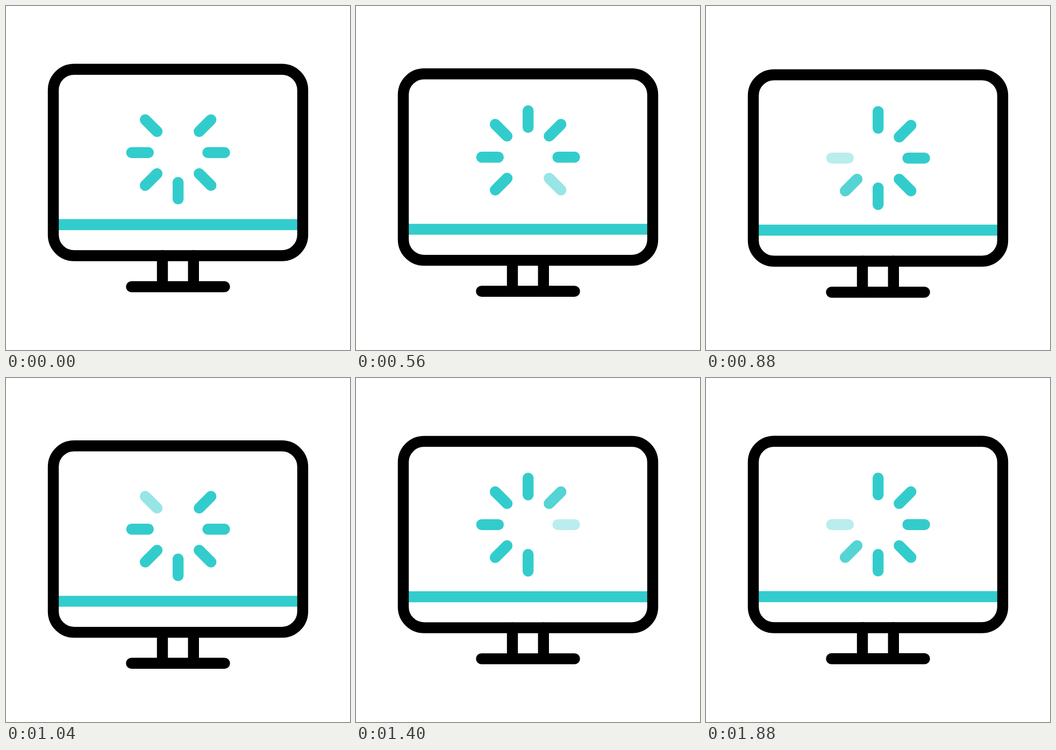
These frames come from a looping animation (640x640 px, 1920 ms). An HTML page:

```html
<!DOCTYPE html>
<html lang="en">
<head>
<meta charset="utf-8">
<title>Loading monitor</title>
<style>
  html, body { margin: 0; width: 100%; height: 100%; overflow: hidden; background: #fff; }
  svg { display: block; width: 100%; height: 100%; }
  .line { fill: none; stroke: #000; stroke-width: 20.4; stroke-linecap: round; }
  .accent { stroke: #33cccc; stroke-width: 20.4; }
  #spokes { stroke-linecap: round; }
</style>
</head>
<body>
<svg viewBox="0 0 640 640">
  <g id="monitor">
    <path class="accent" d="M90 406.8H550"/>
    <rect class="line" x="88" y="117.7" width="464" height="346.8" rx="38.7"/>
    <path class="line" d="M291 464.5V522.2M348.8 464.5V522.2M233.4 522.2H406.6"/>
    <g id="spokes" class="accent" transform="translate(320.2 272.7)"></g>
  </g>
</svg>
<script>
const FRAME = 40, FRAMES = 48;
const SPOKES = 8, STAGGER = 3, LAP = 25, HIDDEN = 3, FADE = 6;
const DROP = 10.4, DROP_START = 3, DROP_PEAK = 20;

const monitor = document.getElementById('monitor');
const group = document.getElementById('spokes');

const spokes = Array.from({ length: SPOKES }, (_, i) => {
  const line = document.createElementNS('http://www.w3.org/2000/svg', 'path');
  line.setAttribute('d', 'M0 -55.4V-86.4');
  line.setAttribute('transform', `rotate(${i * 360 / SPOKES})`);
  group.append(line);
  return line;
});

// Symmetric cubic-bezier(.65, 0, .35, 1), solved by bisection
function ease(x) {
  let lo = 0, hi = 1;
  for (let i = 0; i < 24; i++) {
    const s = (lo + hi) / 2, r = 1 - s;
    if (1.95 * s * r * r + 1.05 * s * s * r + s ** 3 < x) lo = s;
    else hi = s;
  }
  return lo * lo * (3 - 2 * lo);
}

// The monitor sinks to its lowest point and rises back the same way
function dropAt(frame) {
  const x = 1 - Math.abs(frame - DROP_PEAK) / (DROP_PEAK - DROP_START);
  return x > 0 ? DROP * ease(x) : 0;
}

// Each spoke vanishes at once, stays hidden briefly, then fades in
function opacityAt(frame, i) {
  const age = frame - i * STAGGER;
  if (age < 0) return 1;
  const shown = age % LAP - (HIDDEN - 1);
  return Math.min(1, Math.max(0, shown / FADE));
}

function draw(now) {
  const frame = Math.floor(now / FRAME) % FRAMES;
  monitor.setAttribute('transform', `translate(0 ${dropAt(frame).toFixed(3)})`);
  spokes.forEach((line, i) => line.setAttribute('opacity', opacityAt(frame, i)));
}

const start = performance.now();
function tick() {
  draw(performance.now() - start);
  requestAnimationFrame(tick);
}
tick();
</script>
</body>
</html>
```
